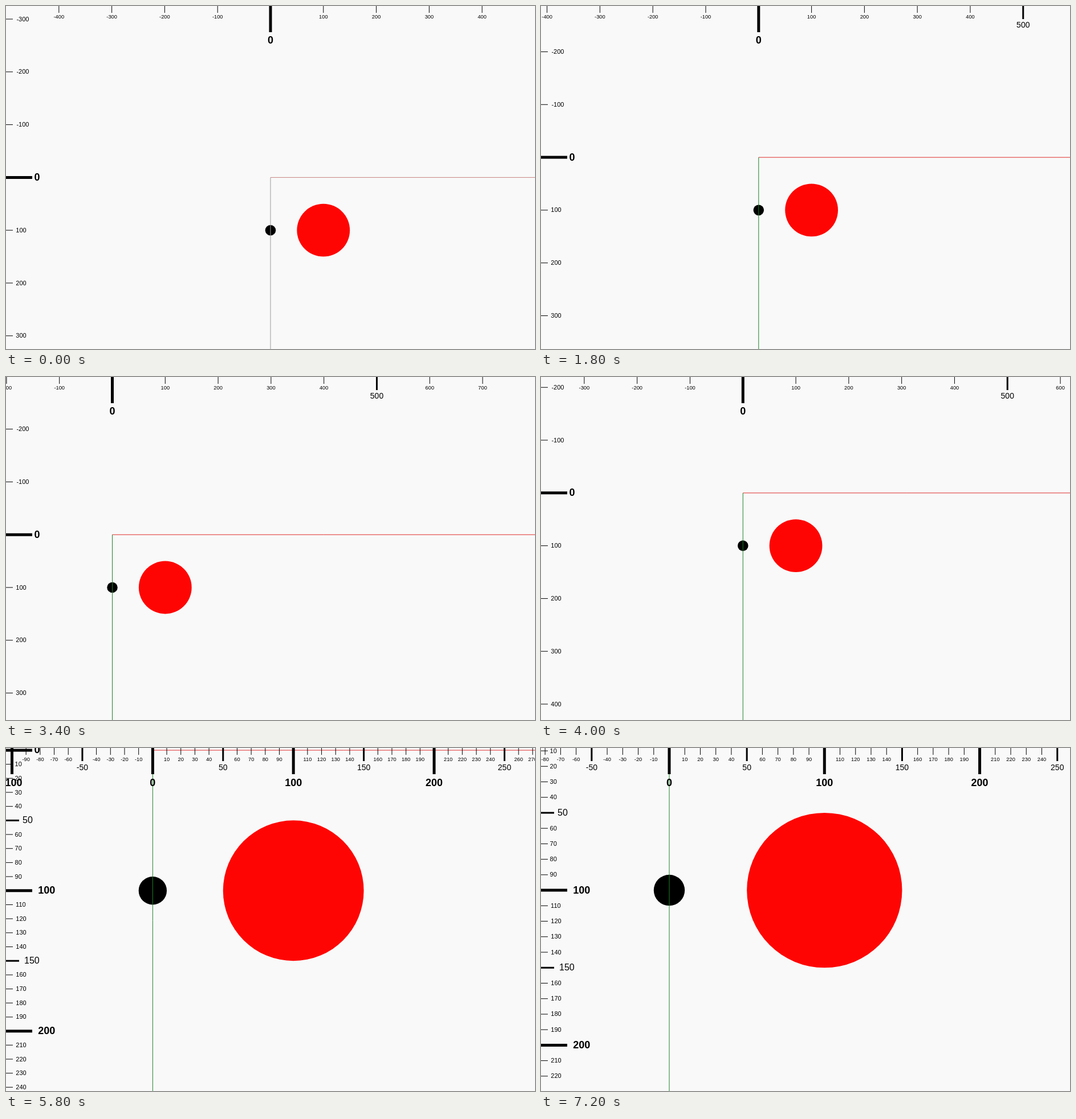
Animation of 928 by 603 pixels, one loop 8000 ms. Source, as an HTML page with a canvas:

```html
<!DOCTYPE html>
<html lang="en">
<head>
<meta charset="utf-8">
<title>Pan and zoom with rulers</title>
<style>
  html, body { margin: 0; width: 100%; height: 100%; overflow: hidden; background: #f9f9f9; }
  canvas { display: block; width: 928px; height: 603px; }
</style>
</head>
<body>
<canvas id="stage" width="928" height="603"></canvas>
<script>
const W = 928, H = 603, LOOP = 8000, STEP = 100;
const canvas = document.getElementById('stage');
const ctx = canvas.getContext('2d');

const linear = u => u;
const easeIn = u => u * u;
const easeOut = u => u * (2 - u);
const smooth = u => u * u * (3 - 2 * u);

// time, origin x, origin y, scale, easing towards the next row
const VIEWS = [
  [0, 464, 301.4, 0.928, linear],
  [1100, 464, 301.4, 0.928, linear],
  [1200, 463.5, 301.4, 0.928, smooth],
  [1900, 377, 264, 0.928, linear],
  [2400, 377, 264, 0.928, easeIn],
  [2600, 416.8, 255.7, 0.928, smooth],
  [3400, 186.5, 277.2, 0.928, smooth],
  [4400, 445.4, 164, 0.928, linear],
  [5200, 445.4, 164, 0.928, smooth],
  [6200, 46, -176, 4.2, easeIn],
  [6400, 69.2, -155.6, 4.009, easeOut],
  [6800, 218, -28, 2.78, linear],
  [7000, 218, -28, 2.78, linear],
  [7200, 225, -22.2, 2.723, linear],
  [LOOP, 225, -22.2, 2.723, linear]
];

const mix = (a, b, u) => a + (b - a) * u;

// Zooming keeps one point of the stage fixed, so the origin follows the scale.
function viewAt(t) {
  let i = 0;
  while (t >= VIEWS[i + 1][0]) i++;
  const [t0, x0, y0, s0, ease] = VIEWS[i];
  const [t1, x1, y1, s1] = VIEWS[i + 1];
  const u = ease((t - t0) / (t1 - t0));
  const s = s0 * Math.pow(s1 / s0, u);
  const v = s0 === s1 ? u : (s - s0) / (s1 - s0);
  return { x: mix(x0, x1, v), y: mix(y0, y1, v), s };
}

function disc(view, x, y, r, color) {
  ctx.fillStyle = color;
  ctx.beginPath();
  ctx.arc(view.x + x * view.s, view.y + y * view.s, r * view.s, 0, 2 * Math.PI);
  ctx.fill();
}

function line(x0, y0, x1, y1, width, color) {
  ctx.strokeStyle = color;
  ctx.lineWidth = width;
  ctx.beginPath();
  ctx.moveTo(x0, y0);
  ctx.lineTo(x1, y1);
  ctx.stroke();
}

const font = (size, bold) =>
  `${bold ? 'bold ' : ''}${size}px "Liberation Sans", Arial, sans-serif`;

// Tick length and width, label sizes on both rulers, label gap factor
const RANKS = [
  { length: 12, width: 1, top: 9.3, left: 11, gap: 0.79 },
  { length: 23, width: 3, top: 14, left: 16, gap: 0.84 },
  { length: 46, width: 5, top: 18, left: 18, gap: 0.84, bold: true }
];

const rankOf = n => n % 10 === 0 ? 2 : n % 5 === 0 ? 1 : 0;

function eachTick(origin, gap, size, draw) {
  const last = Math.floor((size - origin) / gap);
  for (let n = Math.ceil(-origin / gap); n <= last; n++) {
    draw(origin + n * gap, n, rankOf(n));
  }
}

function label(text, x, y) {
  ctx.fillStyle = '#000';
  ctx.fillText(text, x, y + 0.5);
}

function drawRulers({ x, y, s }) {
  const unit = s < 1.5 ? 100 : 10;
  const zoom = s - 0.928;
  const labelY = [
    s < 1.5 ? 19 : 20 - (s - 2.722) * 1.55,
    34 + zoom * 0.45,
    60.5 + zoom * 0.65
  ];
  ctx.textAlign = 'center';
  ctx.textBaseline = 'middle';

  eachTick(x, unit * s, W, (px, n, rank) => {
    const { length, width, top, bold } = RANKS[rank];
    line(px, 0, px, length, width, '#000');
    ctx.font = font(top, bold);
    label(String(n * unit), px, labelY[rank]);
  });

  eachTick(y, unit * s, H, (py, n, rank) => {
    const { length, width, left, gap, bold } = RANKS[rank];
    const text = String(n * unit);
    line(0, py, length, py, width, '#000');
    ctx.font = font(left, bold);
    label(text, length + gap * ctx.measureText(text).width, py);
  });
}

function draw(t) {
  const view = viewAt(t);
  const faint = t < 200;
  ctx.fillStyle = '#f9f9f9';
  ctx.fillRect(0, 0, W, H);
  disc(view, 100, 100, 50, '#fe0503');
  disc(view, 0, 100, 10, '#000');
  line(view.x, view.y, W, view.y, 1, faint ? '#c98080' : '#e02a2a');
  line(view.x, view.y, view.x, H, 1, faint ? '#999' : '#1a8428');
  drawRulers(view);
}

const start = performance.now();
function tick() {
  const t = (performance.now() - start) % LOOP;
  draw(Math.floor(t / STEP) * STEP);
  requestAnimationFrame(tick);
}
tick();
</script>
</body>
</html>
```
